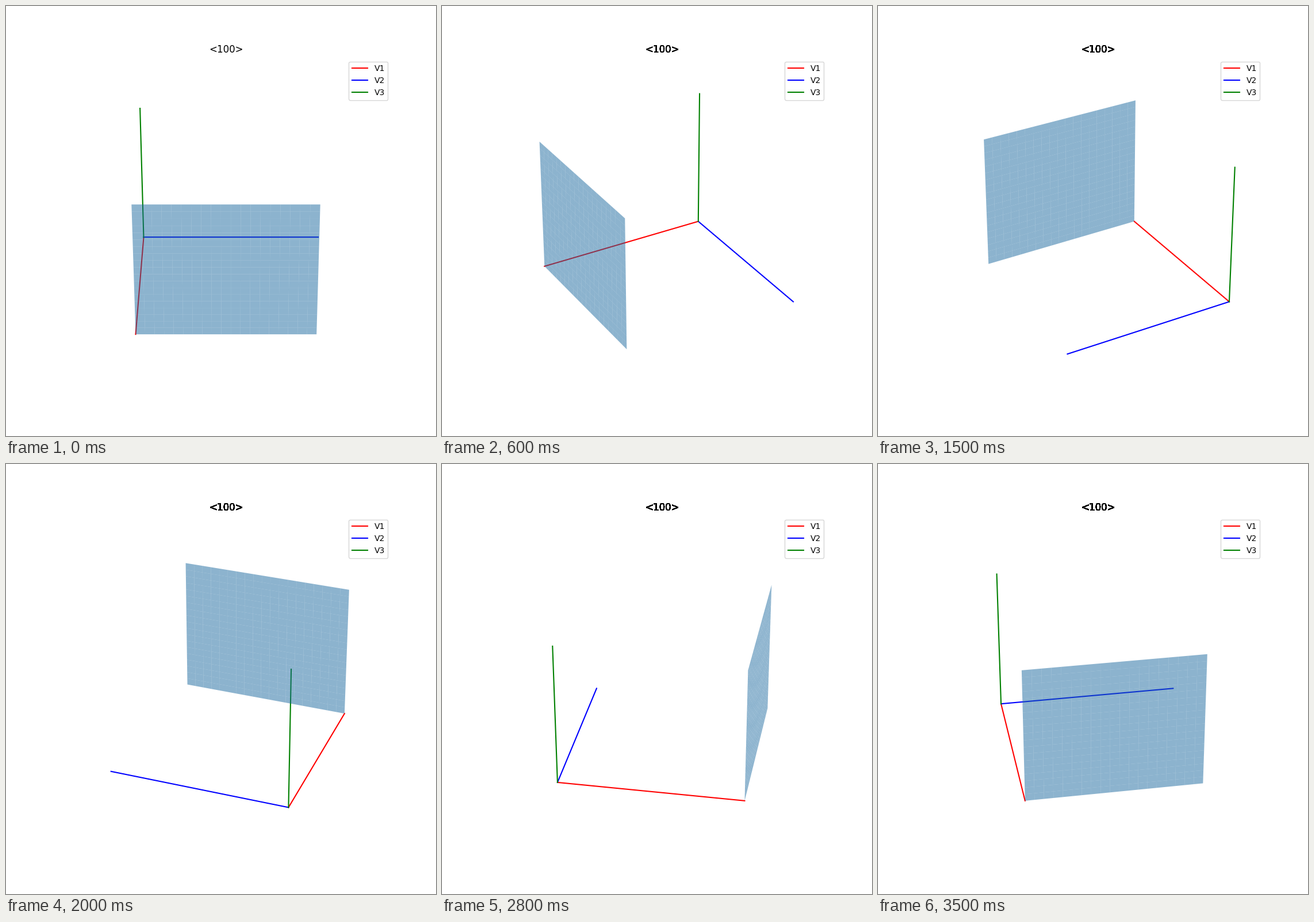
Write a matplotlib script that moves like this. It is 748 px wide and 748 px high and loops after 3600 ms.

```python
import numpy as np
import matplotlib.pyplot as plt
from matplotlib.animation import FuncAnimation

FRAMES = 36
STEP_DEG = 10
TITLE = "<100>"

fig = plt.figure(figsize=(7.48, 7.48), dpi=100)
ax = fig.add_subplot(projection="3d")
ax.set_axis_off()

# Basis vectors from the origin
for k, color in enumerate(("red", "blue", "green")):
    tip = np.eye(3)[k]
    ax.plot(*[(0, c) for c in tip], color=color, label=f"V{k + 1}")

# Plane x = 1
grid = np.arange(20) * 0.05
Y, Z = np.meshgrid(grid, grid, indexing="ij")
ax.plot_surface(np.ones_like(Y), Y, Z, color="C0", alpha=0.5)

ax.set_xlim(-0.05, 1.05)
ax.set_ylim(-0.05, 1.05)
ax.set_zlim(0, 1)
ax.set_box_aspect((4, 4, 3), zoom=0.96)
ax.legend(loc="upper right")

# The title is stacked once more per step, so its edges grow heavier
titles = [
    ax.annotate(TITLE, (0.5, 1), xycoords="axes fraction", xytext=(0, 6),
                textcoords="offset points", ha="center", va="baseline",
                fontsize=12, annotation_clip=False)
    for _ in range(FRAMES)
]


def update(i):
    ax.view_init(elev=30, azim=i * STEP_DEG)
    for k, text in enumerate(titles):
        text.set_visible(k <= i)
    return titles


anim = FuncAnimation(fig, update, frames=FRAMES, interval=100,
                     repeat=True, repeat_delay=0, blit=False)
plt.show()
```
